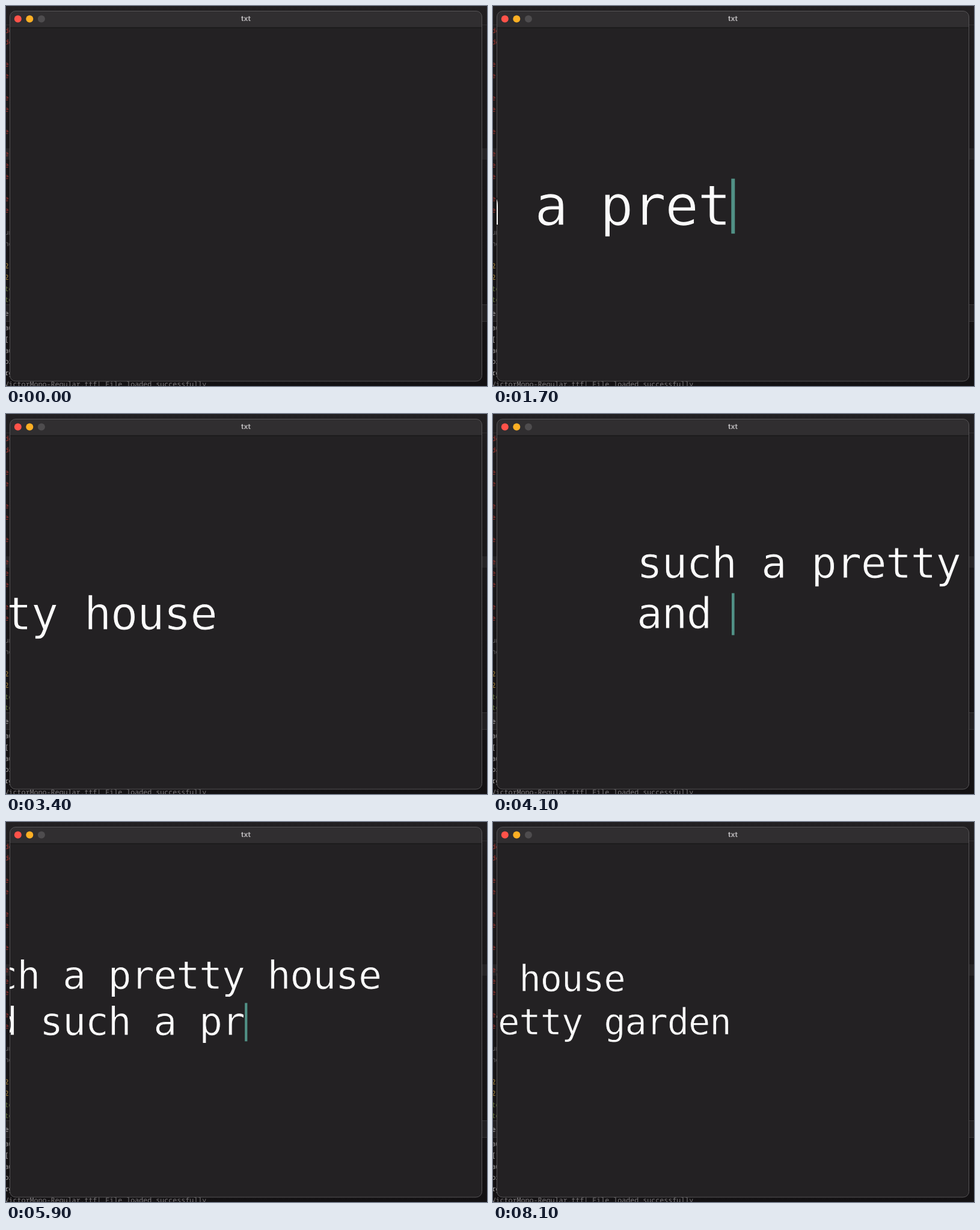
An HTML page that plays this animation: 800 px wide and 633 px high, repeating every 8500 ms.

```html
<!DOCTYPE html>
<html lang="en">
<head>
<meta charset="utf-8">
<title>txt</title>
<style>
  html, body { margin: 0; width: 100%; height: 100%; overflow: hidden; background: #1b191b; }
  svg { display: block; width: 100%; height: 100%; }
  text { white-space: pre; text-rendering: geometricPrecision; }
  .code { font: 11.67px "Noto Sans Mono", "DejaVu Sans Mono", monospace; }
  .title { font: 700 12px Inter, "Open Sans", sans-serif; fill: #b5b3b5; text-anchor: middle; }
  /* The thin outline in the page colour slims the letters. */
  .line {
    font: 103px "DejaVu Sans Mono", "Noto Sans Mono", monospace;
    letter-spacing: -2.2px;
    fill: #fafafa; stroke: #232123; stroke-width: 1.4px;
  }
</style>
</head>
<body>
<svg viewBox="0 0 800 633">
  <defs>
    <linearGradient id="shade" x2="0" y2="1">
      <stop offset="0" stop-color="#222022"/>
      <stop offset=".1" stop-color="#1d1b1d"/>
      <stop offset="1" stop-color="#131113"/>
    </linearGradient>
    <clipPath id="page"><rect x="6" y="37" width="786" height="588"/></clipPath>
  </defs>
  <rect width="800" height="633" fill="url(#shade)"/>
  <path d="M0 31.5H800" stroke="#2f2d2f"/>
  <path d="M0 237H800V256H0Z" fill="#252325"/>
  <path d="M0 497.5H801V525.5H0" fill="#211f21" stroke="#353335"/>
  <g id="backdrop" class="code"></g>

  <rect x="6.5" y="8.5" width="785" height="616.5" rx="9.5" fill="#232123"/>
  <path d="M6.5 36V18a9.5 9.5 0 0 1 9.5 -9.5H782a9.5 9.5 0 0 1 9.5 9.5V36Z" fill="#302e30"/>
  <path d="M7 36H791" stroke="#131213" stroke-width="1.2"/>
  <circle cx="19.8" cy="21.5" r="6" fill="#ff5249"/>
  <circle cx="39.3" cy="21.5" r="6" fill="#fdaf24"/>
  <circle cx="58.9" cy="21.5" r="6" fill="#4e4c4e"/>
  <text class="title" x="399" y="25.3">txt</text>

  <rect x="6.5" y="8.5" width="785" height="616.5" rx="9.5" fill="none" stroke="#565456"/>
  <g clip-path="url(#page)">
    <g id="camera">
      <text class="line" x="-3.5" y="34.6"></text>
      <text class="line" x="-3.5" y="156.9"></text>
    </g>
    <rect id="cursor" fill="#519186"/>
  </g>
</svg>
<script>
const LOOP = 8500, TICK = 100, BLINK = 500;
const ADVANCE = 0.598, LEADING = 1.223;
const CENTER = { x: 399.3, y: 333.4 };

// Text behind the window: [colour, first baseline, row step, rows]
const BACKDROP = [
  ["#a3352f", 45.2, 18.66, ["de", "de", "", "e", "e", "", "e", "e", "", "e", "",
    "e", "e", "e", "", "e", "e"]],
  ["#625f61", 381, 18.66, ["un", "ne"]],
  ["#a8843a", 437, 18.66, ["2", "2"]],
  ["#5f7038", 474.5, 18.66, ["te", "te"]],
  ["#aaa7a9", 516, 0, ["e"]],
  ["#a19e9f", 540.2, 18.75, ["au", "[1", "au", "or", "rg"]],
  ["#7b787a", 634.2, 0, ["VictorMono-Regular.ttf| File loaded successfully"]]
];

// Typing bursts: [keys, start, gap]; "\b" erases one letter
const BURSTS = [
  ["such a pret", 290, 119], ["ty ", 1710, 130], ["house ", 2380, 100],
  ["\n", 3550, 0], ["and sucj", 3690, 108], ["\b", 4680, 0], ["h ", 4820, 200],
  ["a pr", 5330, 130], ["et", 5910, 100], ["ty ", 6230, 140],
  ["ga", 6760, 190], ["rden", 7130, 140]
];
const keys = BURSTS.flatMap(([text, start, gap]) =>
  [...text].map((key, i) => ({ key, time: start + i * gap })));

const camera = document.getElementById("camera");
const cursor = document.getElementById("cursor");
const lines = document.querySelectorAll(".line");

function drawBackdrop() {
  const group = document.getElementById("backdrop");
  for (const [fill, top, step, rows] of BACKDROP) {
    rows.forEach((row, i) => {
      const el = document.createElementNS(group.namespaceURI, "text");
      el.setAttribute("x", -2.5);
      el.setAttribute("y", top + i * step);
      el.setAttribute("fill", fill);
      el.textContent = row;
      group.append(el);
    });
  }
}

const settle = (age, tau) => 1 - Math.exp(-age / tau);
const sizeFor = count => count ? 35.1 + 233.4 / count ** 0.6 : 320;

// Each key moves the targets; cursor and zoom glide after them.
function stateAt(t) {
  let text = "", col = 0, row = 0, x = 0, y = 0, size = sizeFor(0), last = -1;
  for (const { key, time } of keys) {
    if (time > t) break;
    const next = key === "\b" ? text.slice(0, -1) : text + key;
    const split = next.split("\n");
    const newRow = split.length - 1, newCol = split[newRow].length;
    const move = settle(t - time, 55);
    x += (newCol - col) * move;
    y += (newRow - row) * move;
    size += (sizeFor(next.length) - sizeFor(text.length)) * settle(t - time, 70);
    [text, col, row, last] = [next, newCol, newRow, time];
  }
  const shown = last >= 0 && Math.floor((t - last) / BLINK) % 2 === 0;
  return { text, x, y, size, shown };
}

function draw(t) {
  const { text, x, y, size, shown } = stateAt(t);
  const split = text.split("\n");
  lines.forEach((line, i) => { line.textContent = split[i] || ""; });

  const width = size * 0.066, height = size * 1.01;
  const left = CENTER.x - width / 2;
  camera.setAttribute("transform",
    `translate(${left - x * ADVANCE * size} ${CENTER.y - y * LEADING * size}) scale(${size / 100})`);
  const box = { x: left, y: CENTER.y - height / 2, width, height };
  for (const name in box) cursor.setAttribute(name, box[name]);
  cursor.setAttribute("visibility", shown ? "visible" : "hidden");
}

const start = performance.now();
function frame() {
  const t = (performance.now() - start) % LOOP;
  draw(Math.floor(t / TICK) * TICK);
  requestAnimationFrame(frame);
}

drawBackdrop();
frame();
</script>
</body>
</html>
```
